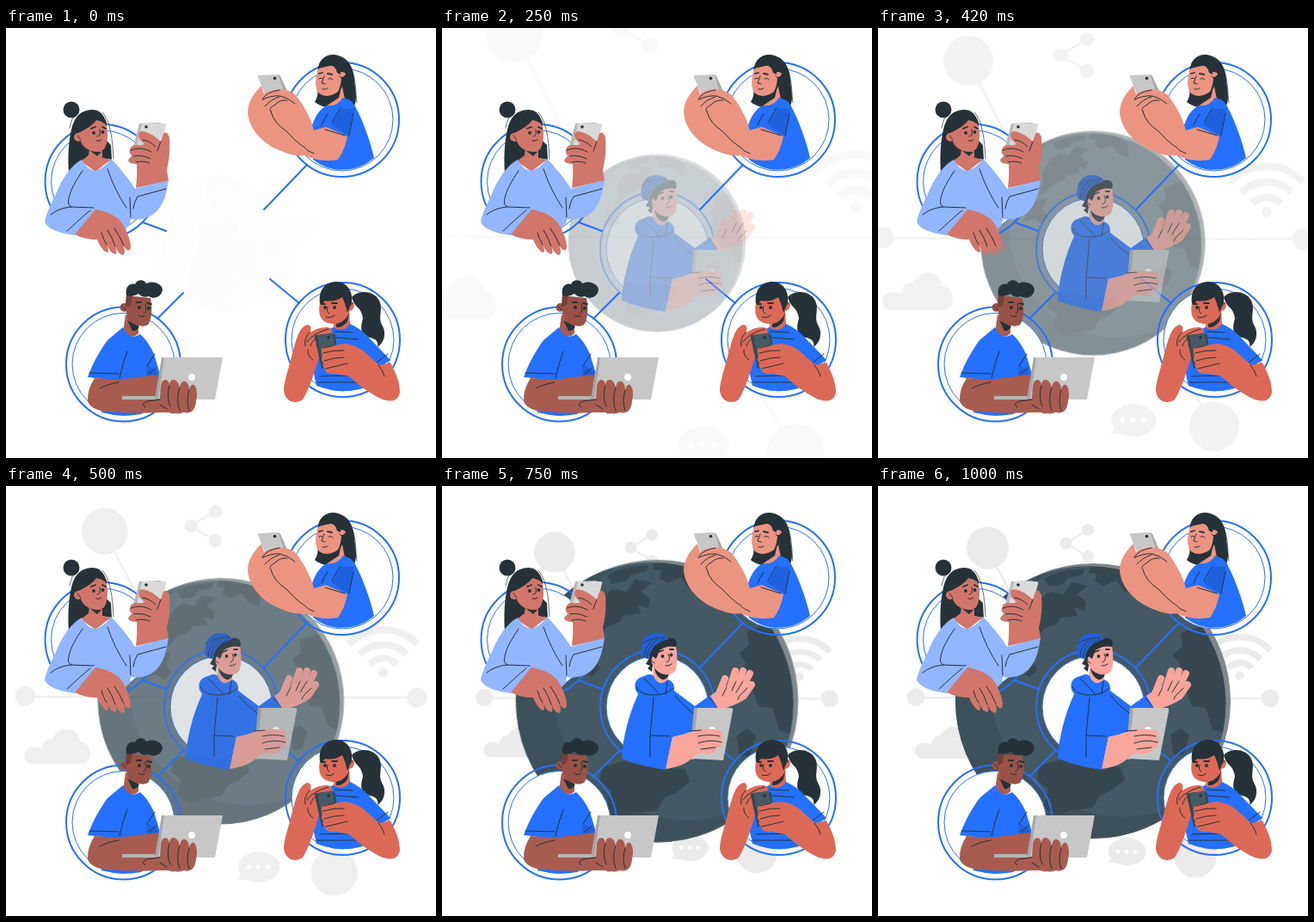
An HTML page that plays this animation: 500x500 px, repeating every 1040 ms.

```html
<!DOCTYPE html>
<html lang="en">
<head>
<meta charset="utf-8">
<title>Connected world</title>
<style>
html, body { margin: 0; width: 100%; height: 100%; overflow: hidden; background: #fff; }
svg { display: block; width: 100vw; height: 100vh; }
path { stroke-linejoin: round; stroke-linecap: round; }
.ring { fill: none; stroke: #2570ff; stroke-width: 2; }
.disc { fill: #fff; stroke: #2570ff; stroke-width: 1; }
.link { fill: none; stroke: #2570ff; stroke-width: 2; }
.ink { fill: none; stroke: #263238; stroke-width: 1; }
.thin { stroke-width: .7; }
.brow { fill: none; stroke: #263238; stroke-width: 1.800; }
.dark { fill: #263238; }
.blue { fill: #2570ff; }
.deep { fill: #1f60dc; }
.sky { fill: #92b6ff; }
.grey { fill: #c7c7c7; }
.edge { fill: #a6a6a6; }
.land { fill: #37474f; }
.icon { fill: #ebebeb; }
.wire { fill: none; stroke: #ebebeb; stroke-width: 2; }
.finger { fill: none; stroke: #f8a59b; stroke-width: 8; }

.icons, .globe, .host {
  animation: 1s cubic-bezier(.36, -.01, .5, 1.38) calc(var(--t, 0) * -1s) both paused;
}
.icons { transform-origin: 250px 256px; animation-name: zoomOut; }
.globe { transform-origin: 250px 250px; animation-name: zoomIn; }
.host { animation-name: fade; }
@keyframes zoomOut { from { opacity: 0; transform: scale(1.5); } to { opacity: 1; transform: scale(1); } }
@keyframes zoomIn { from { opacity: 0; transform: scale(.5); } to { opacity: 1; transform: scale(1); } }
@keyframes fade { from { opacity: 0; } to { opacity: 1; } }
</style>
</head>
<body>
<svg viewBox="0 0 500 500">
  <defs>
    <clipPath id="sphere"><circle cx="250" cy="250" r="160"/></clipPath>
    <clipPath id="front" clip-path="url(#sphere)"><circle cx="244.500" cy="253" r="160"/></clipPath>
    <g id="badge"><circle class="disc" r="59.500"/><circle class="ring" r="66.500"/></g>
  </defs>

  <g class="icons">
    <path class="wire" d="M44 246L456 247M127 72L168 152M369 431L340 383M244 51L218 66.500L244 82"/>
    <g class="icon">
      <circle cx="127.500" cy="72" r="24.500"/><circle cx="369" cy="431" r="24.500"/>
      <circle cx="44" cy="245.500" r="10.500"/><circle cx="456" cy="247" r="10.500"/>
      <circle cx="244" cy="51" r="7"/><circle cx="218.500" cy="66.500" r="7"/><circle cx="244" cy="82" r="7"/>
      <circle cx="420.500" cy="220.500" r="5"/>
      <path d="M52 317C40 316 40 299 53 299C57 299 60 300 62 301C63 292 68 289 72 291C78 277 99 275 102 293C115 295 117 316 103 317Z"/>
      <path d="M267 438Q272 434 270 432A22 16 0 1 1 279 439Q273 438 267 438Z"/>
    </g>
    <path class="wire" style="stroke-width:7.500;stroke-linecap:butt" d="M384.500 191A49.500 49.500 0 0 1 456.500 191M396 201.500A34 34 0 0 1 445 201.500M406.500 212A19 19 0 0 1 434.500 212"/>
    <g fill="#fff"><circle cx="279" cy="425" r="2.300"/><circle cx="289" cy="425" r="2.300"/><circle cx="299" cy="425" r="2.300"/></g>
  </g>

  <g class="globe">
    <circle cx="250" cy="250" r="160" fill="#7f888c"/>
    <g clip-path="url(#front)">
      <rect x="80" y="80" width="340" height="340" fill="#3e5059"/>
      <circle cx="285" cy="230" r="155" fill="#445963"/>
      <g class="land">
        <path d="M193 108C205 99 222 98 240 96L238 103L220 107L215 114L199 117Z"/>
        <path d="M190 130L200 123L216 126L225 112L244 116L231 126L242 134L240 145L228 141L232 151L213 153L207 161L193 166L182 178L173 181L180 164L177 150Z"/>
        <path d="M247 94C259 92 270 94 281 96L300 108V128L286 122L277 110L262 116L252 111L255 102L245 101Z"/>
        <path d="M352 171L384 160C405 198 409 245 401 287L389 283L381 258L365 256L357 235L345 222L351 207L343 196L354 187Z"/>
        <path d="M340 290L352 281L362 290L355 312L344 313Z"/>
        <path d="M160 190L185 187L178 202L186 213L176 222L165 215L152 219L157 205Z"/>
        <path d="M187 326L211 318L242 325L282 327L287 342L271 354L258 360L250 374L225 377L209 383L193 373L198 352L185 342Z"/>
      </g>
    </g>
  </g>

  <path class="link" d="M159 226L186 236M300 211L350 159M206 308L176 338M307 292L341 320"/>
  <use href="#badge" x="112" y="178.500"/>
  <use href="#badge" x="390.500" y="106.500"/>
  <use href="#badge" x="136.500" y="391"/>
  <use href="#badge" x="391.500" y="362.500"/>

  <!-- top left -->
  <g fill="#d1766a">
    <circle class="dark" cx="76" cy="95" r="9.500"/>
    <path class="dark" d="M100 95C87 95 79 104 76 118C72 136 72 154 73 169L90 156L104 150L123 153L122 136L116 130L117 110C113 99 108 95 100 95Z"/>
    <path class="ink thin" d="M112 98C121 108 124 128 125 152M84 96C79 99 76 107 74 116"/>
    <path d="M97 139L112 143L112 151L122 153L104 167L87 155L96 148Z"/>
    <path class="dark" d="M97 142L111 144L106 149Z"/>
    <circle cx="84" cy="127" r="5"/>
    <path d="M84 122C93 118 101 113 105 107C110 108 115 110 117 114C119 125 118 135 114 141C108 146 98 144 92 139C87 135 86 128 84 122Z"/>
    <path class="brow" d="M99 117L104 115M112 115L116 117"/>
    <path class="ink" d="M109 118Q111 126 106 126M105 131Q108 132 111 130M83 125L87 130"/>
    <circle class="dark" cx="102" cy="122" r="1.900"/><circle class="dark" cx="112.500" cy="121" r="1.900"/>
    <path class="sky" d="M88 153C75 160 64 177 58 193C51 207 46 218 45 226C49 234 63 239 80 241L105 222L115 244C128 242 137 237 144 229L145 222C158 224 170 220 177 211C184 203 187 191 189 176L150 187C142 174 130 160 122 152Q113 165 102 166Q94 164 88 153Z"/>
    <path class="ink" d="M89 166C81 178 75 188 73 198Q71 206 76 208L102 209M76 208Q62 209 52 217M98 212C90 218 80 228 71 236M118 164Q126 188 140 209M144 197L145 220M186 187L153 196Q149 202 148 210"/>
    <path d="M80 240L104 211C118 213 133 220 138 232C143 242 147 254 144 258Q140 260 136 252Q140 262 136 264Q131 264 127 253Q130 262 127 263Q121 262 117 251Q121 261 117 261Q110 257 106 246Q91 246 80 240Z"/>
    <path class="ink" d="M111 238Q113 246 117 252M118 235Q124 244 127 254M126 233Q133 243 137 253"/>
    <path fill="#b9b9b9" d="M155 111L180 110L170 157H146Q143 156 144 153Z"/>
    <path fill="#d9d9d9" d="M158 111H184Q187 111 186 114L175 157H148Z"/>
    <circle class="dark" cx="163" cy="115" r="1.800"/>
    <path d="M151 186Q153 170 152 158Q143 158 142 154Q143 150 149 149Q142 147 144 142Q145 135 153 136Q156 137 161 135L155 129Q152 121 158 120Q168 121 180 132L183 123Q187 119 190 127C191 141 190 152 187 165L189 177Z"/>
    <path class="ink" d="M145 142Q157 137 169 144M148 149Q158 147 168 152M151 156Q160 154 167 157M159 130Q167 131 174 138M180 132L176 143"/>
  </g>

  <!-- top right -->
  <g fill="#eb9481">
    <path class="dark" d="M363 48C363 37 372 30 382 31C397 33 404 45 405 60C406 73 409 81 405 91C397 87 390 82 384 82L372 92Q364 90 359 86Q364 78 362 68Z"/>
    <path class="ink thin" d="M397 39C408 53 406 74 408 87"/>
    <path d="M384 80L391 68L394 83Q387 92 372 91Z"/>
    <path class="dark" d="M374 78L390 68L387 81L372 91L364 87Z"/>
    <path d="M363 47C360 57 358 69 364 76C371 81 380 79 386 74Q390 66 390 57Q394 57 395 53Q391 49 387 53L381 43Z"/>
    <path class="dark" d="M362 49C365 38 372 36 379 37Q390 43 389 54L385 52Q384 44 375 43Q366 44 362 49Z"/>
    <path class="brow" d="M364 53L368 52M374 53L379 54"/>
    <path class="ink" d="M364 59Q366 57 368 59M375 59Q378 57 380 60M370 56L367 64L371 65M368 71Q372 72 374 70M388 56L392 60"/>
    <path class="blue" d="M373 90Q385 92 392 81Q402 83 406 91C416 110 424 133 428 151C410 167 379 171 357 153L355 116Q361 96 373 90Z"/>
    <path class="deep" d="M390 94L404 94L398 125L379 113Z"/>
    <path class="ink" d="M374 100Q369 107 367 113M389 93L379 110M404 99L399 125"/>
    <path class="grey" d="M293 57Q292 55 295 55L315 54Q318 54 319 57L326 75L302 79Z"/>
    <path class="edge" d="M317 54Q319 55 320 58L327 74L324 77Z"/>
    <circle class="dark" cx="312.500" cy="58.500" r="1.800"/>
    <path d="M297 67C290 74 281 85 281 98C282 114 294 130 311 139C326 147 341 150 347 148C362 155 377 155 386 153Q394 142 397 126L372 115L358 119C354 103 345 88 336 77Q325 70 313 72Q304 73 300 77Z"/>
    <path class="ink" d="M298 83Q303 74 318 72M299 83Q309 78 319 79Q328 81 336 88M301 91Q308 83 318 80M308 97Q304 94 313 89M308 97Q311 110 326 120Q335 130 344 137M313 89Q319 83 327 84M345 137Q351 144 358 146M371 118L394 125"/>
  </g>

  <!-- bottom left -->
  <g fill="#a85c50">
    <path d="M139 333L154 344V355Q147 363 136 354Z"/>
    <path class="dark" d="M141 340L155 347Q152 353 147 352Z"/>
    <g fill="#985246">
      <circle cx="137.500" cy="325" r="5"/>
      <path d="M140 311L168 314C170 324 170 336 166 344C160 350 148 345 142 338Q138 330 140 311Z"/>
    </g>
    <path fill="#723f38" d="M140 309L147 309L145 322L139 325Z"/>
    <path class="dark" d="M140 311C138 301 144 296 150 298C152 292 161 292 163 297C171 293 181 297 182 304C181 313 172 316 166 312C161 314 157 312 154 309Q148 313 140 311Z"/>
    <path class="brow" d="M152 319L157 319M164 320L169 321"/>
    <path class="ink" d="M162 321Q165 330 160 332M154 334Q157 337 161 335M135 323L139 328"/>
    <circle class="dark" cx="155" cy="325" r="2"/><circle class="dark" cx="166" cy="326" r="2"/>
    <path class="blue" d="M136 348Q143 364 156 356Q166 365 172 379L179 402L172 440L157 449Q134 453 111 447L112 408L95 406C101 389 110 374 118 363Z"/>
    <path class="deep" d="M164 392L177 399L172 411L163 403Z"/>
    <path class="ink" d="M141 376Q136 389 132 407M164 393L173 379M166 402L175 395M97 401L131 402"/>
    <path d="M103 407L130 409L177 403V431L187 417Q193 424 200 424L218 427L211 447L178 447Q148 449 119 446Q99 445 95 434Q94 421 103 407Z"/>
    <path class="ink" d="M109 419Q118 414 131 412"/>
    <path fill="#b5b5b5" d="M135 428H180V432H135Z"/>
    <path class="edge" d="M181 383H188L181 432H173Z"/>
    <path class="grey" d="M184 383H252L243 432H177Z"/>
    <circle fill="#fff" cx="216" cy="406" r="4"/>
    <path d="M160 436Q171 432 179 431L180 416Q181 409 186 409Q190 410 190 417Q190 408 196 409Q201 411 202 419Q203 409 209 411Q213 414 213 421Q215 413 219 415Q224 422 221 434Q220 446 213 447Q209 449 207 445Q204 450 197 448Q190 450 186 443L164 443Q157 441 160 436Z"/>
    <path class="ink" d="M162 441Q156 437 164 434L179 432M190 416Q186 429 191 440M202 418Q197 432 202 445M213 421Q209 434 213 445M179 438L187 443"/>
  </g>

  <!-- bottom right -->
  <g fill="#dc6957">
    <path class="dark" d="M402 313C410 304 428 305 434 317C439 327 432 336 437 345C443 354 440 366 432 371Q434 362 423 360C410 357 413 345 415 338Q414 329 408 324Q404 320 402 313Z"/>
    <path d="M383 338L399 326L400 344L413 354Q396 360 380 350Z"/>
    <path class="dark" d="M384 344L399 331L397 341Q391 349 384 348Z"/>
    <path d="M366 314C364 324 362 335 370 341Q379 347 390 342Q399 336 399 329Q405 328 405 321Q402 315 397 320L390 309Z"/>
    <path class="dark" d="M365 320C363 304 372 295 384 295C396 295 404 306 402 319L397 331Q394 319 391 313Q382 319 371 317L367 322Z"/>
    <path class="brow" d="M367 321L371 321M379 320L385 320"/>
    <path class="ink" d="M374 324Q372 331 376 332M372 336Q378 338 382 334M399 323L403 320"/>
    <circle class="dark" cx="371" cy="325" r="1.900"/><circle class="dark" cx="382" cy="325" r="1.900"/>
    <path class="blue" d="M380 348Q393 355 400 344Q413 350 421 359L447 386L434 395L424 395L418 418Q391 427 361 416L357 398Q359 358 380 348Z"/>
    <path class="ink" d="M382 353L403 354M384 360L409 362M365 405L407 404M362 412L414 412M431 389L444 379"/>
    <path d="M351 345C340 347 337 365 331 386C327 402 323 412 323 422C325 435 337 438 345 432C352 421 357 405 361 393L368 369L378 356Q381 349 374 348Q364 347 354 354Q356 346 351 345Z"/>
    <path class="ink" d="M353 354Q346 361 348 370M350 365Q357 355 375 350M354 370Q356 362 365 358M351 374Q350 381 357 386"/>
    <path fill="#37474f" d="M359 360Q358 357 361 357L379 355Q382 355 383 358L387 391L367 396Z"/>
    <path fill="#455a64" d="M362 357L380 355L386 390L369 394Z"/>
    <circle class="dark" cx="375" cy="360" r="1.700"/>
    <path d="M367 376Q366 370 375 370L394 367Q405 368 415 375Q425 384 434 392L447 389C454 403 458 412 458 424C455 436 446 434 438 432C422 425 409 414 399 405L384 402Q370 403 371 396Q367 394 369 389Q365 386 368 382Z"/>
    <path class="ink" d="M369 378Q381 374 393 375M370 387Q381 383 393 383M372 396Q385 393 397 390M433 392Q438 397 440 405M369 372L382 369"/>
  </g>

  <!-- centre -->
  <g class="host" fill="#f8a59b">
    <use href="#badge" x="250.500" y="257"/>
    <path d="M246 211L263 216V226Q263 235 257 238Q246 234 245 222Z"/>
    <path class="dark" d="M247 212L264 219Q261 226 256 225Q249 222 247 212Z"/>
    <path d="M246 194L259 185L272 186C274 198 274 209 271 215C265 223 251 219 247 211Q241 209 241 203Q241 197 246 197Z"/>
    <path class="dark" d="M241 200Q243 187 254 179Q264 175 271 178Q274 182 272 187Q261 185 253 191L249 201L245 198Q242 204 245 208L244 216L239 212L242 209L237 207Z"/>
    <path fill="#245fd6" d="M232 197C230 183 235 171 249 171Q260 171 263 178Q250 182 244 190L241 201Q235 201 232 197Z"/>
    <path class="ink thin" d="M233 183Q243 176 260 176M235 199Q235 187 245 179M238 200Q239 187 251 178M241 198Q244 187 257 178"/>
    <path class="brow" d="M252 193L257 191M265 190L269 190"/>
    <path class="ink" d="M263 195Q267 203 261 205M260 209Q263 210 267 207M243 203L247 206"/>
    <circle class="dark" cx="256.500" cy="198" r="1.900"/><circle class="dark" cx="266.500" cy="196.500" r="1.900"/>
    <path class="blue" d="M225 237Q222 224 235 221Q243 217 246 221Q252 235 263 225Q271 228 270 238L294 256L312 243L323 257Q309 272 299 273L293 286L268 292L260 330Q232 326 209 317C210 294 217 266 228 242Z"/>
    <path class="ink" d="M226 233Q229 242 243 243Q260 244 269 235M235 224Q248 236 253 243M262 227L260 242M246 246L242 290L265 291M242 290L242 315M271 244Q282 257 292 264M311 246L320 257"/>
    <path class="finger" d="M321 244L329 224M333 240L341 215M340 240L350 215M346 242L358 218M351 244L360 231"/>
    <path d="M312 244Q320 239 325 232L357 236Q360 240 353 247C345 254 333 256 323 262Z"/>
    <path class="ink" d="M331 234L326 244M342 227L337 238M350 227L342 240M355 235L348 242Q345 244 344 248"/>
    <path class="edge" d="M293 258H299L293 318H289Q287 317 288 314Z"/>
    <path class="grey" d="M297 258H336Q339 258 338 262L327 319L291 317Z"/>
    <circle fill="#fff" cx="314" cy="284" r="4"/>
    <path d="M268 292Q282 289 293 284Q308 281 323 284Q328 288 324 291Q329 294 325 299Q326 304 319 306Q319 311 309 311Q298 309 291 316Q282 326 260 329Z"/>
    <path class="ink" d="M298 291Q311 288 323 291M298 299Q312 294 325 298M301 306L318 304M288 285L301 284"/>
  </g>
</svg>
<script>
const loop = 1040, steps = 25;
const root = document.documentElement;

// The clock advances in 25 held steps per loop.
function tick() {
  const step = Math.floor(((performance.now() + 4) % loop) / loop * steps);
  root.style.setProperty('--t', Math.min(1, (step + 1.1) / steps));
  requestAnimationFrame(tick);
}
tick();
</script>
</body>
</html>
```
